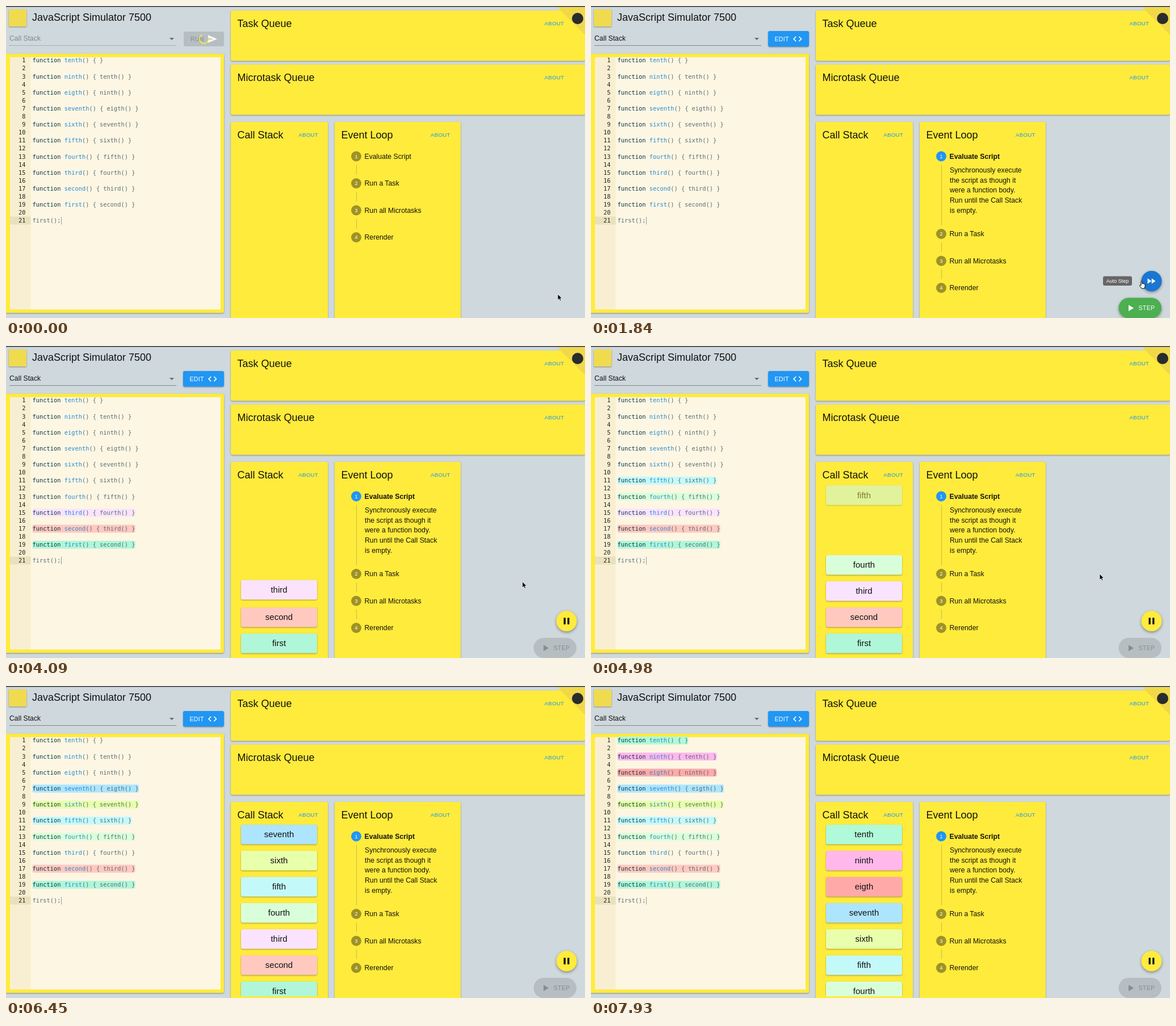
An HTML page for the animation above (8000 ms loop, 1020 by 549 pixels).

```html
<!DOCTYPE html>
<html lang="en">
<head>
<meta charset="utf-8">
<title>Call stack</title>
<style>
  html, body { margin: 0; height: 100%; overflow: hidden; background: #cfd8dc; }
  svg { display: block; width: 100vw; height: 100vh; }
  text { font: 12.25px "Liberation Sans", Arial, sans-serif; fill: #111; white-space: pre; }
  .head { font-size: 18px; }
  .about { font-size: 9.8px; letter-spacing: .2px; fill: #2196f3; }
  .button { font-size: 10.6px; letter-spacing: .3px; fill: #fff; }
  .tip, .num { font-size: 9px; fill: #fff; text-anchor: middle; }
  .code { font: 10.36px "DejaVu Sans Mono", monospace; fill: #586e75; }
  .line { fill: #222; text-anchor: end; }
  .key { fill: #073642; }
  .name { fill: #268bd2; }
  .card { font-size: 15px; text-anchor: middle; }
  .yellow { fill: #ffeb3b; }
  .blue { fill: #2196f3; }
  .white { fill: #fff; }
  .shadow { filter: drop-shadow(0 1px 1px rgba(0, 0, 0, .36)); }
  .raised { filter: drop-shadow(0 2px 2.5px rgba(0, 0, 0, .38)); }
</style>
</head>
<body>
<svg viewBox="0 0 1020 549">
  <defs>
    <clipPath id="stackClip"><rect x="405" y="242" width="155" height="304"/></clipPath>
    <clipPath id="infoClip"><rect id="infoBox" x="620" y="276" width="180" height="0"/></clipPath>
  </defs>
  <rect width="1020" height="549" fill="#cfd8dc"/>
  <rect width="1020" height="1.5" fill="#2c3138"/>

  <rect x="5" y="6" width="31" height="30" fill="#f0db4f" class="shadow"/>
  <text x="46" y="26" class="head">JavaScript Simulator 7500</text>

  <text id="choice" x="6" y="61">Call Stack</text>
  <path id="underline" d="M6 69.5H300" stroke="#7f878a"/>
  <path d="M288 56h8l-4 4z" fill="#666c6e"/>

  <g id="run">
    <rect x="313" y="45" width="71" height="26" rx="3" fill="#b6bec2"/>
    <text x="325" y="61.8" class="button" style="fill:#858c8f">RUN</text>
    <path class="white" transform="translate(354.5 48.9) scale(.76)" d="M2 21L23 12 2 3v7l15 2-15 2z"/>
    <circle id="spinner" cx="348.8" cy="58" r="8" fill="none" stroke="#ffeb3b" stroke-width="1.7"/>
  </g>
  <g id="edit">
    <rect x="312" y="44" width="72" height="27.5" rx="3" class="blue shadow"/>
    <text x="323.5" y="61.7" class="button">EDIT</text>
    <path class="white" transform="translate(354.4 48.6) scale(.78)"
      d="M9.4 16.6L4.8 12l4.6-4.6L8 6l-6 6 6 6zm5.2 0l4.6-4.6-4.6-4.6L16 6l6 6-6 6z"/>
  </g>

  <rect x="-3" y="84" width="387" height="456" rx="3" class="yellow shadow"/>
  <rect x="7" y="90" width="371" height="444" fill="#fdf6e3"/>
  <rect x="7" y="90" width="36.5" height="444" fill="#f8efd2"/>
  <rect x="7" y="370.5" width="36.5" height="14" fill="#e9e1be"/>
  <g id="marks"></g>
  <g id="code"></g>
  <path d="M97.5 371v13.5" stroke="#999"/>

  <g id="panels"></g>
  <path d="M971 2h49v49z" fill="#f0d84a"/>
  <circle cx="1007" cy="22" r="10" fill="#292b2c"/>

  <g id="steps"></g>
  <g clip-path="url(#infoClip)" id="info"></g>
  <g clip-path="url(#stackClip)" id="stack"></g>

  <g id="auto">
    <circle id="autoDisc" cx="987.5" cy="484" r="18" class="raised"/>
    <path id="autoIcon"/>
  </g>
  <g id="step">
    <rect id="stepBox" x="929.5" y="513.5" width="75.5" height="35.5" rx="17.75"/>
    <g id="stepLabel" class="white">
      <path d="M947 526v11l9-5.5z"/>
      <text x="964.5" y="535.3" class="button" style="fill:inherit">STEP</text>
    </g>
  </g>
  <g id="tip">
    <rect id="tipBox" y="475.5" height="16.5" rx="3" fill="#666"/>
    <text id="tipText" y="487" class="tip"></text>
  </g>
  <path id="pointer"/>
</svg>
<script>
const $ = id => document.getElementById(id);
const set = (el, attrs) => { for (const k in attrs) el.setAttribute(k, attrs[k]); };
const show = (el, on) => { el.style.display = on ? '' : 'none'; };
const clamp = x => Math.max(0, Math.min(1, x));
const mix = (a, b, p) => a + (b - a) * p;
const easeOut = p => 1 - (1 - clamp(p)) ** 3;

const LOOP = 8000, READY = 1300, AUTO = 2280;
const FIRST = 2840, EVERY = 520, DROP = 280;

// The picture advances in bursts: start, end, number of updates.
const bursts = [[150, 1180, 8], [1330, 1840, 4], [2280, 3200, 7], [3350, 4240, 7], [4540, 4680, 2],
  [4980, 5270, 3], [5560, 5710, 2], [6010, 7040, 8], [7190, 7340, 2], [7640, 7930, 3]];
const ticks = [0];
for (const [a, b, n] of bursts)
  for (let i = 0; i < n; i++) ticks.push(mix(a, b, i / (n - 1)));

const names = ['first', 'second', 'third', 'fourth', 'fifth', 'sixth', 'seventh', 'eigth', 'ninth', 'tenth'];
const colors = ['#b0f6d9', '#ffc9c0', '#fae3ff', '#d9ffda', '#c4f9f9',
  '#e8ffab', '#ade5ff', '#ffaaa9', '#ffb7ec', '#b0f9d9'];
const rowY = line => 95.5 + 14.1 * (line - 1);

// Editor
let code = '';
for (let n = 1; n <= 21; n++) code += `<text class="code line" x="34.5" y="${rowY(n) + 3.8}">${n}</text>`;
names.forEach((name, i) => {
  const line = 19 - 2 * i, y = rowY(line);
  const body = names[i + 1] ? `() { ${names[i + 1]}() }` : '() { }';
  const width = 6.24 * (9 + name.length + body.length);
  code += `<text class="code" x="46.6" y="${y + 3.8}"><tspan class="key">function</tspan> ` +
    `<tspan class="name">${name}</tspan>${body}</text>`;
  $('marks').innerHTML += `<rect x="46.6" y="${y - 6.5}" width="${width}" height="13.8" rx="2" fill="${colors[i]}"/>`;
  $('stack').innerHTML += `<g><rect x="414" width="134" height="34.5" rx="3" fill="${colors[i]}" class="shadow"/>` +
    `<text class="card" x="481" y="22.3">${name}</text></g>`;
});
$('code').innerHTML = code + `<text class="code" x="46.6" y="${rowY(21) + 3.8}">first();</text>`;

// Panels: title, x, y, width, height, x of the link
$('panels').innerHTML = [
  ['Task Queue', 396, 8, 624, 88.5, 948.5],
  ['Microtask Queue', 396, 103, 624, 88.5, 948.5],
  ['Call Stack', 396, 204, 171, 350, 515.3],
  ['Event Loop', 579, 204, 222, 350, 748]
].map(([title, x, y, w, h, link]) =>
  `<rect x="${x}" y="${y}" width="${w}" height="${h}" rx="3" class="yellow shadow"/>
   <text class="head" x="${x + 11.5}" y="${y + 28.6}">${title}</text>
   <text class="about" x="${link}" y="${y + 26.2}">ABOUT</text>`).join('');

// Event loop
$('steps').innerHTML = ['Evaluate Script', 'Run a Task', 'Run all Microtasks', 'Rerender'].map((label, i) => {
  const y = 264.5 + 47.5 * i;
  return `<g><path stroke="#c9bb4e" d="${i < 3 ? `M617.5 ${y + 15}v17` : ''}"/>
    <circle cx="617" cy="${y}" r="9" fill="#9e9225"/>
    <text class="num" x="617" y="${y + 3.3}">${i + 1}</text>
    <text x="631.5" y="${y + 4.4}">${label}</text></g>`;
}).join('');
$('info').innerHTML = ['Synchronously execute', 'the script as though it', 'were a function body.',
  'Run until the Call Stack', 'is empty.'].map((s, i) => `<text x="632" y="${292.6 + 17.9 * i}">${s}</text>`).join('');

const [evaluate, ...later] = $('steps').children;
const cards = [...$('stack').children], marks = [...$('marks').children];

const forward = { d: 'M4 18l8.5-6L4 6v12zm9-12v12l8.5-6L13 6z', fill: '#fff', transform: 'translate(977.3 474.4) scale(.8)' };
const pause = { d: 'M6 19h4V5H6zm8-14v14h4V5z', fill: '#111', transform: 'translate(977.5 474) scale(.83)' };
const arrow = { d: 'M0 0V10.5L2.5 8.2 4.2 12 6 11.2 4.4 7.6H7.6Z', fill: '#000', stroke: '#fff', 'stroke-width': .8 };
const hand = { d: 'M3 7V1.2Q3 0 4 0T5 1.2V4.5Q9.5 4 10 6V9.5L9 13H4L.5 8.5Q0 7 1.5 7L3 8Z', fill: '#fff', stroke: '#000', 'stroke-width': 1 };

// Pointer path: time, x, y
const path = [[0, 972, 507], [150, 972, 507], [1180, 975, 514], [1500, 971, 498], [1840, 966, 484],
  [2280, 966, 484], [2600, 978, 484], [3350, 978, 484], [4240, 896, 401], [LOOP, 896, 401]];

function drawPointer(t) {
  const i = path.findIndex(p => p[0] > t), [a, x0, y0] = path[i - 1], [b, x1, y1] = path[i];
  const p = (t - a) / (b - a);
  set($('pointer'), t >= READY && t < 3500 ? hand : arrow);
  set($('pointer'), { transform: `translate(${mix(x0, x1, p)} ${mix(y0, y1, p)})` });
  show($('pointer'), t < 6250);
}

function drawControls(t) {
  const ready = t >= READY, auto = t >= AUTO;
  show($('run'), !ready);
  show($('edit'), ready);
  $('choice').style.fill = ready ? '#111' : '#82898c';
  set($('underline'), { 'stroke-dasharray': ready ? 'none' : '1 1' });

  const turn = t / 1400, arc = 29 + 9 * Math.cos(turn * 2 * Math.PI);
  set($('spinner'), { 'stroke-dasharray': `${arc} 60`, transform: `rotate(${turn * 540 - 25} 348.8 58)` });

  const zoom = easeOut((t - READY) / 225);
  for (const [id, x, y] of [['auto', 987.5, 484], ['step', 967, 531]])
    set($(id), { transform: `translate(${x} ${y}) scale(${zoom}) translate(${-x} ${-y})` });
  set($('autoDisc'), { fill: auto ? '#ffeb3b' : t < 1600 ? '#2196f3' : '#1976d2' });
  set($('autoIcon'), auto ? pause : forward);
  set($('stepBox'), { fill: auto ? '#b6bec2' : '#4caf50', class: auto ? '' : 'raised' });
  $('stepLabel').style.fill = auto ? '#868d90' : '#fff';

  const left = auto ? 875 : 902;
  set($('tipBox'), { x: left, width: 953 - left });
  set($('tipText'), { x: (left + 953) / 2 });
  $('tipText').textContent = auto ? 'Pause Auto Step' : 'Auto Step';
  set($('tip'), { opacity: clamp((t - 1620) / 160) * clamp((3650 - t) / 160) });
}

function drawSteps(t) {
  const open = easeOut((t - READY) / 300), on = t >= READY;
  const [line, disc, , label] = evaluate.children;
  set(line, { d: `M617.5 279.5v${17 + 89.5 * open}` });
  set(disc, { fill: on ? '#2196f3' : '#9e9225' });
  label.style.fontWeight = on ? 'bold' : 'normal';
  for (const g of later) set(g, { transform: `translate(0 ${89 * open})` });
  set($('infoBox'), { height: 95 * open });
}

// Top of card k when the stack holds n cards
const slot = (k, n) => n < 7 ? 506 - 46 * k : 244 + 46 * (n - 1 - k);

function drawStack(t) {
  const n = Math.min(10, Math.max(0, Math.floor((t - FIRST) / EVERY) + 1));
  const e = easeOut((t - FIRST - (n - 1) * EVERY) / DROP);
  cards.forEach((card, k) => {
    const newest = k === n - 1;
    const from = newest ? slot(k, n) - 158 : slot(k, n - 1);
    show(card, k < n);
    show(marks[k], k < n && !(k === 2 && t >= 6010));
    set(card, { transform: `translate(0 ${mix(from, slot(k, n), e)})`, opacity: newest ? e : 1 });
  });
}

const start = performance.now();
function frame() {
  const now = (performance.now() - start) % LOOP;
  const t = ticks.findLast(x => x <= now + 5);
  drawControls(t);
  drawSteps(t);
  drawStack(t);
  drawPointer(t);
  requestAnimationFrame(frame);
}
frame();
</script>
</body>
</html>
```
